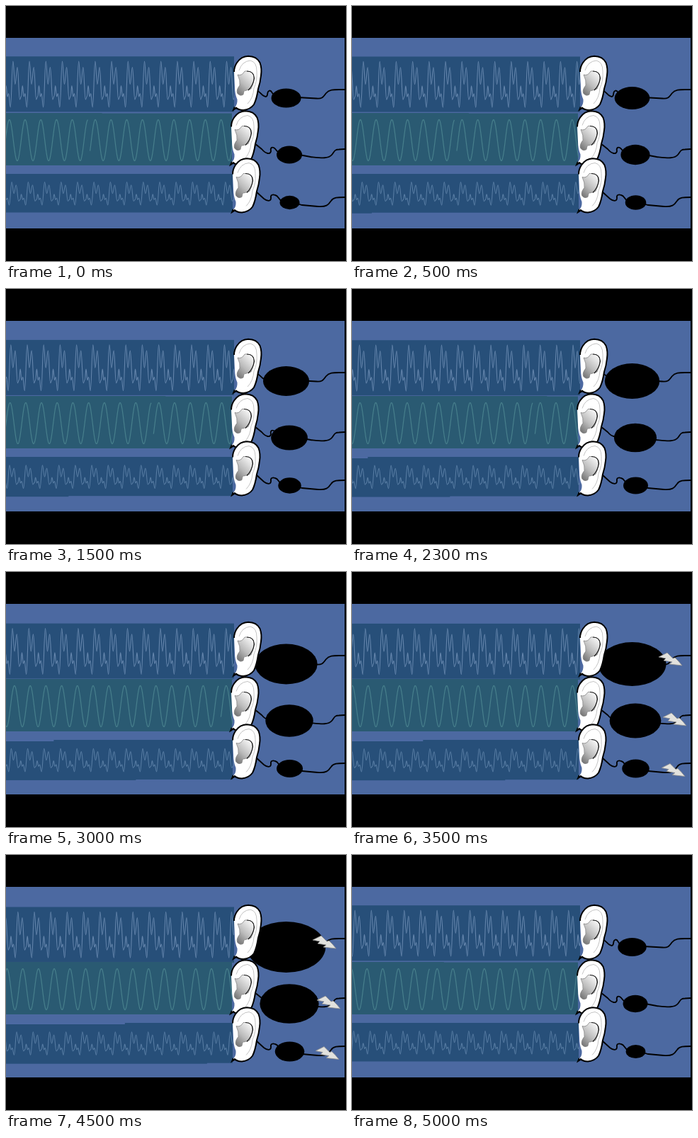
Animation of 480x360 px, one loop 5.1 s. Source, as an HTML page with a canvas:

```html
<!DOCTYPE html>
<html lang="en">
<head>
<meta charset="utf-8">
<title>Ears and sound waves</title>
<style>
html, body { margin: 0; width: 100%; height: 100%; overflow: hidden; background: #000; }
canvas { display: block; }
</style>
</head>
<body>
<canvas id="stage" width="480" height="360"></canvas>
<script>
const ctx = document.getElementById('stage').getContext('2d');
const LOOP = 5100, RESTART = 4900, BOLTS_ON = 3500;
const PERIOD = 23.2, SINE_PERIOD = 22.2, RIGHT = 322;

// One period of the jagged wave: x offset, height (0 = top, 1 = bottom)
const JAGGED = [[0, 0], [3, .5], [6.2, .13], [9.6, .83], [11.8, .76], [13.4, .53],
  [15.4, .77], [17, .7], [19.6, 1]];

const path = {
  ear: new Path2D('M322 94Q322 86 326 80Q332 71 342 70.7Q354 71 358.5 80Q361.5 88 360 98Q359 108 356 117Q354 131 350 139Q345 146 335 147Q327 147 323 143Q327 139 326.5 132Q323 124 323 114Z'),
  rim: new Path2D('M322 93Q322 86 326 80Q332 71 342 70.7Q354 71 358.5 80Q361.5 88 360 98Q359 108 356 117Q354 131 350 139Q345 146 335 147Q328 147 324 143'),
  tip: new Path2D('M319 149L322 142L327 144Z'),
  bowl: new Path2D('M327 97Q333 99 337 92Q347 91 349.5 97Q351 106 346 117L338 119.5Q336 118 335 125Q330 128 326.5 123Q325 118 330 112Q331 105 327 97Z'),
  inner: new Path2D('M340 92Q350 92 350.5 102Q349 112 342 119'),
  fold: new Path2D('M329 91Q333 78 345 77Q354 79 354 92Q355 106 350 116Q349 130 341 138'),
  bolt: new Path2D('M433 120L445 114L453 122L456 121L461 126L466 132L448 130L452 127L440 125L443 122Z')
};
const bowlFill = ctx.createLinearGradient(326, 122, 349, 98);
bowlFill.addColorStop(0, '#777');
bowlFill.addColorStop(.45, '#bbb');
bowlFill.addColorStop(1, '#f4f4f4');

const ears = [[0, 0], [-4, 77.5], [-2, 144.5]];
const bolts = [[0, 0], [6, 85], [4, 156.5]];
const blobs = [
  { x: 395.5, y: 130, rx: 21, ry: 13.4, growX: 7.7, growY: 5 },
  { x: 400, y: 210, rx: 18, ry: 12.5, growX: 5.25, growY: 3.4 },
  { x: 400.5, y: 277.5, rx: 14, ry: 9.7, growX: 1.5, growY: .95 }
];
const wires = new Path2D(
  'M354 119C360 122 362 128 367 128C371 127 367 121 372 119.5C376 119 375 125 380 127' +
  'M412 129L438 130.5C447 131.5 448 128 452 123C456 118 462 118 470 118L478 118' +
  'M351 194L361 202C367 209 373 210 374 205C373 200 375 199 378 200C382 202 382 207 388 209' +
  'M414 210L430 213C445 214.5 455 216 460 210C464 205 464 202.5 470 202.5L478 202' +
  'M353 262L364 272C369 276 374 276 374 271C373 266 377 266 380 267C385 268 384 273 390 276' +
  'M411 279L418 281L440 283C452 284 455 281 459 275C462 270 468 270 478 270');

function rect(color, x, y, w, h) {
  ctx.fillStyle = color;
  ctx.fillRect(x, y, w, h);
}

function stroke(color, width, shape) {
  ctx.strokeStyle = color;
  ctx.lineWidth = width;
  shape ? ctx.stroke(shape) : ctx.stroke();
}

function at([x, y], draw) {
  ctx.save();
  ctx.translate(x, y);
  draw();
  ctx.restore();
}

function jaggedWave(phase, top, height, color) {
  const points = [];
  const start = ((phase % PERIOD) + PERIOD) % PERIOD - 2 * PERIOD;
  for (let x = start; x < RIGHT + PERIOD; x += PERIOD)
    for (const [dx, v] of JAGGED) points.push([x + dx, top + v * height]);
  ctx.beginPath();
  points.forEach(([x, y], i) => {
    const [px, py] = points[i - 1] || [x, y];
    ctx.bezierCurveTo(px + (x - px) * .4, py, x - (x - px) * .4, y, x, y);
  });
  stroke(color, 1.1);
}

function sinePiece(from, to, peak) {
  ctx.beginPath();
  for (let x = from; x < to; x += .5)
    ctx.lineTo(x, 189.5 - 29 * Math.cos((x - peak) / SINE_PERIOD * 2 * Math.PI));
  stroke('#477f8c', 1.2);
}

function strips(offset) {
  const drift = offset / 130;
  const blue = '#274f79', teal = '#2a5a72';
  ctx.save();
  ctx.beginPath();
  ctx.rect(0, 45, RIGHT, 269);
  ctx.clip();

  rect(blue, 0, 71.2 + drift, 323, 78.2 - drift * .3);
  rect(teal, 0, 151.5, 319, 73.5);
  rect(teal, 0, 151, 134 + offset, 1);
  // The lower strip slopes slightly, so its edges step as it slides
  const bottom = 291.5 + drift;
  rect(blue, 0, 237, 320, bottom - 237);
  rect('#4d6aa4', 0, 237, offset - 119, 2);
  rect(blue, 0, bottom - 1, offset - 3, 2);

  jaggedWave(offset + 8.3, 78 + drift, 65, '#6586ad');
  // The sine has a seam where its phase jumps
  const seam = 114 + offset;
  sinePiece(-1, Math.min(seam, 320), seam + .2);
  sinePiece(seam + 3, 320, seam + 10.5);
  jaggedWave(offset + 6.6, 248.5 + drift * .6, 32.5, '#577ca3');
  ctx.restore();
}

function ear() {
  ctx.fillStyle = '#000';
  ctx.fill(path.tip);
  ctx.fillStyle = '#fff';
  ctx.fill(path.ear);
  ctx.fillStyle = bowlFill;
  ctx.fill(path.bowl);
  stroke('#777', .7, path.bowl);
  stroke('#aaa', .7, path.fold);
  stroke('#111', 1.2, path.inner);
  stroke('#000', 2, path.rim);
}

function bolt() {
  ctx.fillStyle = '#e2e2de';
  ctx.fill(path.bolt);
  stroke('#8d8d8d', .8, path.bolt);
}

function draw(ms) {
  const t = (ms >= RESTART ? ms - LOOP : ms) / 1000;
  rect('#000', 0, 0, 480, 360);
  rect('#4c69a1', 0, 45, 478, 269);
  strips(1.5 + 58 * t + 1.2 * t * t);

  stroke('#000', 1.8, wires);
  ctx.fillStyle = '#000';
  for (const b of blobs) {
    ctx.beginPath();
    ctx.ellipse(b.x, b.y, b.rx + b.growX * t, b.ry + b.growY * t, 0, 0, 2 * Math.PI);
    ctx.fill();
  }
  for (const place of ears) at(place, ear);
  if (t * 1000 >= BOLTS_ON) for (const place of bolts) at(place, bolt);
}

function tick() {
  draw(performance.now() % LOOP);
  requestAnimationFrame(tick);
}
tick();
</script>
</body>
</html>
```
